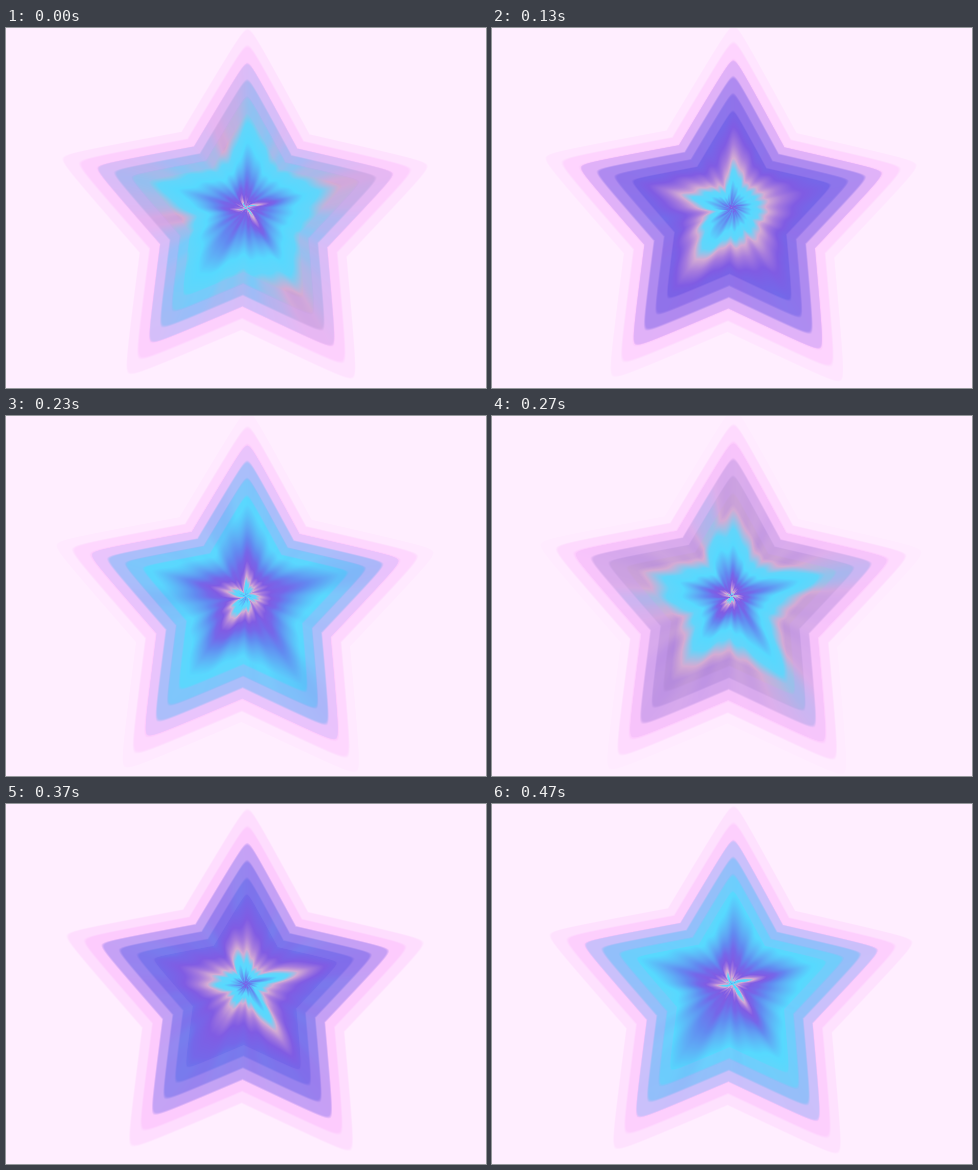
Write an HTML page with a canvas that moves like this. It is 480 by 360 pixels and loops after 510 ms.

```html
<!DOCTYPE html>
<html lang="en">
<head>
<meta charset="utf-8">
<title>Glowing star</title>
<style>
  html, body { margin: 0; width: 100%; height: 100%; overflow: hidden; background: #ffeeff; }
  canvas { display: block; }
</style>
</head>
<body>
<canvas id="stage" width="480" height="360"></canvas>
<script>
const W = 480, H = 360, CX = 240, CY = 180, LOOP = 510;
const STARTS = [0, 30, 70, 100, 140, 170, 200, 240, 270, 300, 330, 370, 430, 470];
const BAND = 0.14;
const ctx = document.getElementById('stage').getContext('2d');

const rgb = hex => [1, 3, 5].map(i => parseInt(hex.slice(i, i + 2), 16));
const mix = (a, b, k) => a.map((v, i) => v + (b[i] - v) * k);
const ramp = (from, to, x) => Math.min(1, Math.max(0, (x - from) / (to - from)));
const cross = (a, b) => a[0] * b[1] - a[1] * b[0];

// Evenly spaced colours of one wave, from its pink front to its cyan tail.
const WAVE = ['#d4acd2', '#a57adc', '#7c58e2', '#7064e8', '#5c88f0', '#58b2f6', '#50dcff', '#5cd8fb'].map(rgb);
const [SKY, PINK, LILAC] = ['#ffeeff', '#fdc8fd', '#cda0f5'].map(rgb);

const palette = Array.from({ length: 512 }, (_, i) => {
  const x = i / 64, n = Math.floor(x);
  return mix(WAVE[n], WAVE[(n + 1) % 8], x - n);
});
const halo = Array.from({ length: 800 }, (_, i) => {
  const s = i / 400;
  return mix(mix(LILAC, PINK, ramp(0.95, 1.22, s)), SKY, ramp(1.2, 1.5, s));
});

// A regular star, seen from a zoom centre slightly above its middle.
const corner = (radius, turn) => {
  const a = (turn / 5) * 2 * Math.PI - Math.PI / 2 + 0.02;
  return [238.5 + radius * Math.cos(a) - CX, 189 + radius * Math.sin(a) - CY];
};
const ARMS = [0, 1, 2, 3, 4].map(i => ({
  tip: corner(138, i), before: corner(75, i - 0.5), after: corner(75, i + 0.5)
}));

function edge(p, tip, notch) {
  const d = [notch[0] - tip[0], notch[1] - tip[1]];
  return cross(p, d) / cross(tip, d);
}

// Size of the round-tipped star that passes through p.
function starSize(p) {
  const arm = ARMS.find(({ before, after }) => cross(before, p) >= 0 && cross(p, after) >= 0);
  if (!arm) return 0;
  const a = edge(p, arm.tip, arm.before), b = edge(p, arm.tip, arm.after);
  return (a + b + Math.hypot(a - b, 0.1 * Math.max(a, b))) / 2;
}

// Rays where one wave runs ahead and the next one lags.
const RAYS = [-0.22, 1.03, 3.02, -1.9];
function rayBend(angle) {
  const rays = RAYS.reduce((sum, at) => sum + Math.exp(45 * (Math.cos(angle - at) - 1)), 0);
  return 0.24 * rays - 0.08 - 0.1 * Math.max(0, Math.cos(angle - 2.2)) ** 4;
}

const pixels = Array.from({ length: W * H }, (_, i) => {
  const x = i % W + 0.5 - CX, y = Math.floor(i / W) + 0.5 - CY;
  const size = starSize([x, y]);
  const angle = Math.atan2(y, x) + 0.5 * Math.exp(-Math.hypot(x, y) / 7);
  const spread = 0.3 + 1.2 * Math.exp(-3 * size);
  return {
    size,
    depth: Math.log(Math.min(0.75, size) + 0.17) / 1.6,
    bend: rayBend(angle) * spread,
    streak: (0.03 * Math.sin(11 * angle + 1) + 0.025 * Math.sin(23 * angle + 2)) * spread
  };
});

function paint(time) {
  const image = ctx.createImageData(W, H), data = image.data;
  const shift = time / LOOP + 0.4;
  pixels.forEach(({ size, depth, bend, streak }, i) => {
    // Stepped halo, growing by one band per loop.
    const band = (size - 1) / BAND - shift, whole = Math.floor(band);
    const k = ramp(0.75, 1, band - whole);
    const level = 1 + BAND * (whole + k * k * (3 - 2 * k) + 0.5 + shift);
    const outer = halo[Math.min(799, Math.max(0, Math.round(level * 400)))];

    // Colour waves running inward, two per loop.
    let u = depth + 2 * time / LOOP;
    u += bend * Math.cos(Math.PI * u) + streak;
    const inner = palette[Math.floor((u - Math.floor(u)) * 512) & 511];

    const cover = 0.95 * ramp(1.22, 0.75, level);
    for (let n = 0; n < 3; n++) data[i * 4 + n] = outer[n] + (inner[n] - outer[n]) * cover;
    data[i * 4 + 3] = 255;
  });
  return image;
}

const poses = STARTS.map(paint);
let shown = -1;

function draw(now) {
  const time = now % LOOP;
  const step = STARTS.filter(start => start <= time).length - 1;
  if (step !== shown) ctx.putImageData(poses[shown = step], 0, 0);
  requestAnimationFrame(draw);
}
draw(0);
</script>
</body>
</html>
```
